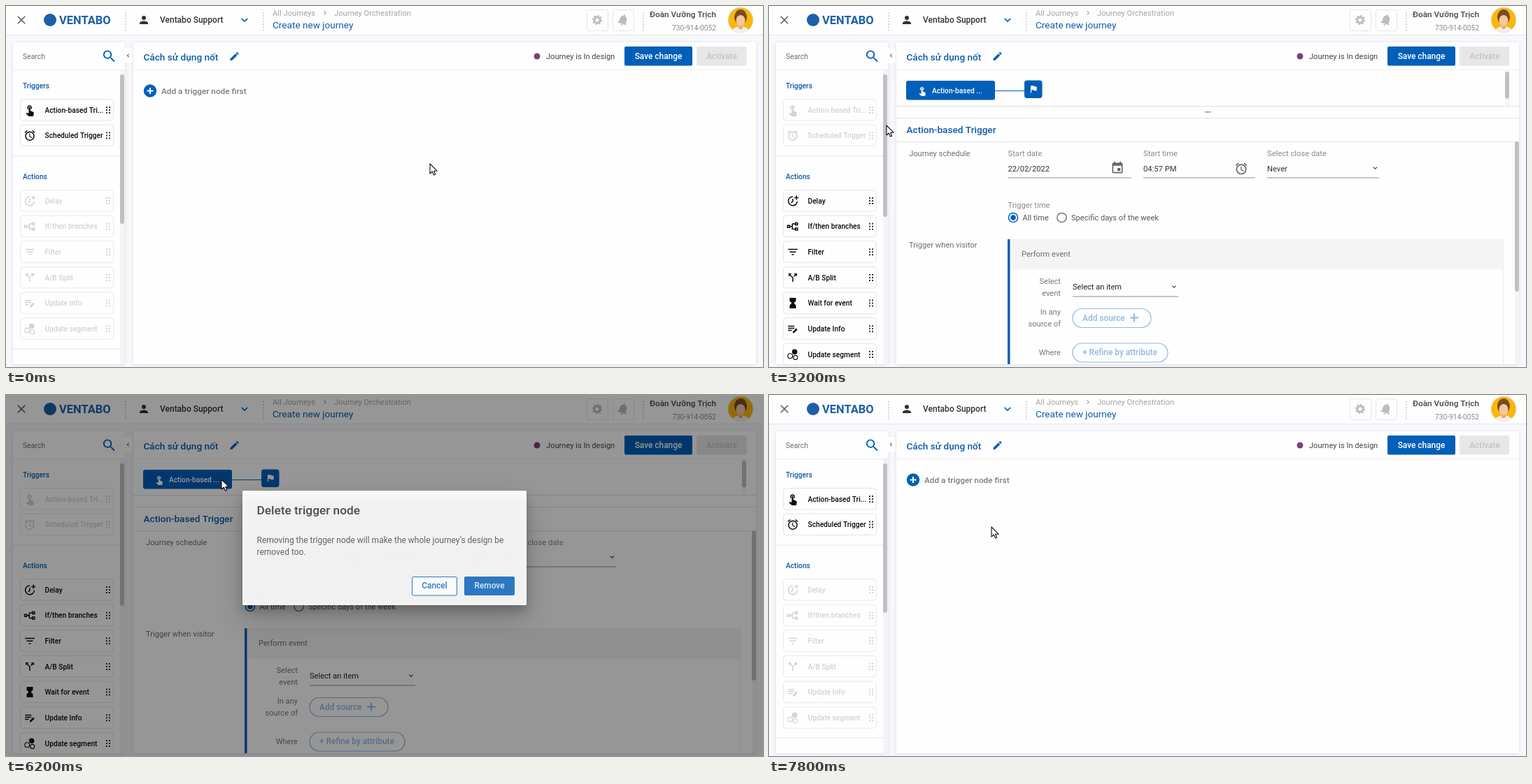
An HTML page with a canvas for the animation above (8000 ms loop, 1082 by 517 pixels).

```html
<!DOCTYPE html>
<html lang="vi">
<head>
<meta charset="utf-8">
<title>Create new journey</title>
<style>
html, body { margin: 0; width: 100%; height: 100%; overflow: hidden; background: #f7f8fb; }
canvas { display: block; width: 1082px; height: 517px; }
</style>
</head>
<body>
<canvas id="stage" width="1082" height="517"></canvas>
<script>
const ctx = document.getElementById('stage').getContext('2d');
const LOOP = 8000, STEP = 200;
const BLUE = '#005fb8', TITLE = '#0f5ba8', WHITE = '#fefefe', GREY = '#6e6e6e', OFF = '#d2d2d2', PALE = '#8fb9df';

// Filled and stroked icons on a 24 unit grid
const FILLED = {
  touch: 'M9 11.24V7.5C9 6.12 10.12 5 11.5 5S14 6.12 14 7.5v3.74c1.21-.81 2-2.18 2-3.74C16 5.01 13.99 3 11.5 3S7 5.01 7 7.5c0 1.56.79 2.93 2 3.74zm9.84 4.63l-4.54-2.26c-.17-.07-.35-.11-.54-.11H13v-6c0-.83-.67-1.5-1.5-1.5S10 6.67 10 7.5v10.74l-3.67-.75-1.58 1.13 4.94 4.94c.27.27.65.44 1.06.44h6.79c.75 0 1.33-.55 1.44-1.28l.75-5.27c.1-.7-.36-1.36-.89-1.58z',
  alarm: 'M22 5.72l-4.6-3.86-1.29 1.53 4.6 3.86zM7.88 3.39L6.6 1.86 2 5.71l1.29 1.53zM12.5 8H11v6l4.75 2.85.75-1.23-4-2.37zM12 4a9 9 0 1 0 0 18 9 9 0 1 0 0-18zm0 16a7 7 0 1 1 0-14 7 7 0 1 1 0 14z',
  person: 'M12 12a4 4 0 1 0 0-8 4 4 0 1 0 0 8zm0 2c-2.67 0-8 1.34-8 4v2h16v-2c0-2.66-5.33-4-8-4z',
  search: 'M15.5 14h-.79l-.28-.27A6.47 6.47 0 0 0 16 9.5 6.5 6.5 0 1 0 9.5 16c1.61 0 3.09-.59 4.23-1.57l.27.28v.79l5 4.99L20.49 19zm-6 0a4.5 4.5 0 1 1 0-9 4.5 4.5 0 1 1 0 9z',
  edit: 'M3 17.25V21h3.75L17.81 9.94l-3.75-3.75zM20.71 7.04a1 1 0 0 0 0-1.41l-2.34-2.34a1 1 0 0 0-1.41 0l-1.83 1.83 3.75 3.75z',
  close: 'M19 6.41L17.59 5 12 10.59 6.41 5 5 6.41 10.59 12 5 17.59 6.41 19 12 13.41 17.59 19 19 17.59 13.41 12z',
  down: 'M16.59 8.59L12 13.17 7.41 8.59 6 10l6 6 6-6z',
  filter: 'M10 18h4v-2h-4zM3 6v2h18V6zm3 7h12v-2H6z',
  split: 'M14 4l2.29 2.29-2.88 2.88 1.42 1.42 2.88-2.88L20 10V4zm-4 0H4v6l2.29-2.29 4.71 4.7V20h2v-8.41l-5.29-5.3z',
  wait: 'M6 2v6l4 4-4 4v6h12v-6l-4-4 4-4V2z',
  bell: 'M12 22a2 2 0 0 0 2-2h-4a2 2 0 0 0 2 2zm6-6v-5c0-3.07-1.64-5.64-4.5-6.32V4a1.5 1.5 0 0 0-3 0v.68C7.63 5.36 6 7.92 6 11v5l-2 2v1h16v-1z',
  date: 'M17 12h-5v5h5zM16 1v2H8V1H6v2H5a2 2 0 0 0-2 2v14a2 2 0 0 0 2 2h14a2 2 0 0 0 2-2V5a2 2 0 0 0-2-2h-1V1zm3 18H5V8h14z',
  flag: 'M14.4 6L14 4H5v17h2v-7h5.6l.4 2h7V6z',
  info: 'M3 10h12v2H3zM3 6h12v2H3zM3 14h7v2H3zM12 20v-2.5l6.5-6.5 2.5 2.5-6.500 6.500z'
};
const STROKED = {
  delay: 'M12 4a8.500 8.500 0 1 0 8.500 9M12 8v5l-3 3M19 2v8M15 6h8',
  branch: 'M5 12h6M11 7v10M11 7h6M11 17h6M2 10h4v4H2zM17 5h4v4h-4zM17 15h4v4h-4z'
};
const paths = {};
for (const k in FILLED) paths[k] = new Path2D(FILLED[k]);
for (const k in STROKED) paths[k] = new Path2D(STROKED[k]);
const ARROW = new Path2D('M0 0V14L3.300 11 5.500 16 7.700 15 5.600 10.200H10Z');
const HAND = new Path2D('M-1.500 1.200C-1.500-.6 1.400-.6 1.400 1.200V6.600C1.800 5.600 4 5.800 4 7.200 4.600 6.200 6.600 6.600 6.600 8 7.400 7.200 9 7.800 9 9V13C9 15 7.600 16 7.600 18.500H-.2C-.2 16.600-3.200 14.400-4.600 11.400-5.200 9.800-3.400 9-2.400 10.200L-1.500 11.400Z');
const FINGERS = new Path2D('M1.400 6.600V10M4 7.200V10M6.600 8V10.500');

function box(x, y, w, h, fill, r = 0, stroke, lw = 1) {
  ctx.beginPath();
  ctx.roundRect(x, y, w, h, r);
  if (fill) { ctx.fillStyle = fill; ctx.fill(); }
  if (stroke) { ctx.strokeStyle = stroke; ctx.lineWidth = lw; ctx.stroke(); }
}

function shadowBox(x, y, w, h, r, color, blur, dy) {
  ctx.save();
  ctx.shadowColor = color;
  ctx.shadowBlur = blur;
  ctx.shadowOffsetY = dy;
  box(x, y, w, h, WHITE, r);
  ctx.restore();
}

function dot(x, y, r, fill, stroke, lw = 1.5) {
  ctx.beginPath();
  ctx.arc(x, y, r, 0, 7);
  if (fill) { ctx.fillStyle = fill; ctx.fill(); }
  if (stroke) { ctx.strokeStyle = stroke; ctx.lineWidth = lw; ctx.stroke(); }
}

function line(x1, y1, x2, y2, color, lw = 1) {
  ctx.beginPath();
  ctx.moveTo(x1, y1);
  ctx.lineTo(x2, y2);
  ctx.strokeStyle = color;
  ctx.lineWidth = lw;
  ctx.stroke();
}

// y is the middle of the capitals
function text(s, x, y, size, color, weight = 400, align = 'left') {
  ctx.font = `${weight} ${size}px Roboto, sans-serif`;
  ctx.textAlign = align;
  ctx.fillStyle = color;
  ctx.fillText(s, x, y + size * 0.36);
}

function icon(name, x, y, size, color, turn = 0) {
  ctx.save();
  ctx.translate(x, y);
  ctx.rotate(turn);
  ctx.scale(size / 24, size / 24);
  ctx.translate(-12, -12);
  ctx.fillStyle = ctx.strokeStyle = color;
  ctx.lineWidth = 2;
  if (name === 'segment') {
    dot(15.5, 7, 5, color);
    dot(7, 15, 4.5, null, color, 1.5);
    dot(17, 18, 4, null, color, 1.5);
  } else if (STROKED[name]) ctx.stroke(paths[name]);
  else ctx.fill(paths[name]);
  ctx.restore();
}

function gear(x, y, color) {
  ctx.beginPath();
  for (let i = 0; i < 32; i++) {
    const a = (i + 0.5) * Math.PI / 16, r = i % 4 < 2 ? 7.4 : 5.5;
    ctx.lineTo(x + r * Math.cos(a), y + r * Math.sin(a));
  }
  ctx.fillStyle = color;
  ctx.fill();
  dot(x, y, 2.6, WHITE);
}

function dots(x) {
  for (let y = 9; y < 34; y += 4) box(x - 1, y, 2, 2, '#d6d6d6');
}

function avatar(x, y) {
  ctx.save();
  dot(x, y, 18, '#fbb60a', '#e8e4da', 1);
  ctx.clip();
  ctx.beginPath();
  ctx.ellipse(x, y + 18, 13, 9, 0, 0, 7);
  ctx.fillStyle = '#f1efec';
  ctx.fill();
  box(x - 3, y + 6, 6, 7, '#e2a97c', 2);
  ctx.beginPath();
  ctx.ellipse(x, y - 4, 9, 11, 0, 0, 7);
  ctx.fillStyle = '#7a4a20';
  ctx.fill();
  ctx.beginPath();
  ctx.ellipse(x, y + 1, 6.5, 8, 0, 0, 7);
  ctx.fillStyle = '#f3c7a0';
  ctx.fill();
  ctx.restore();
}

function header() {
  box(0, 0, 1082, 41, WHITE);
  line(0, 41.5, 1082, 41.5, '#e6e6ea');
  icon('close', 22, 20, 20, '#666');
  dot(63, 20, 9, '#1d5fa9');
  text('VENTABO', 76, 20, 16.5, '#1d5fa9', 700);
  dots(171); dots(368); dots(911);
  icon('person', 197, 20, 18, '#333');
  text('Ventabo Support', 220, 20, 12, '#333', 500);
  icon('down', 341, 20, 19, BLUE);
  text('All Journeys', 381, 10, 11.2, '#a5a5a5');
  icon('down', 456, 10, 12, '#999', -Math.PI / 2);
  text('Journey Orchestration', 469, 10, 11.2, '#a5a5a5');
  text('Create new journey', 381, 27, 13.6, TITLE);
  for (const x of [830.5, 867.5]) box(x, 5.5, 30, 30, WHITE, 3, '#e6e6e6');
  gear(845, 20, '#bdbdbd');
  icon('bell', 882, 20, 20, '#bdbdbd', 0.3);
  text('Đoàn Vưỡng Trịch', 1015, 12, 11.8, '#444', 500, 'right');
  text('730-914-0052', 1015, 31, 10.2, '#8a8a8a', 400, 'right');
  avatar(1050, 20);
}

function item(name, label, y, on) {
  const color = on ? '#0a0a0a' : OFF;
  box(20.5, y - 15.5, 133, 30.5, WHITE, 4, on ? '#e4e4e4' : '#e9e9e9');
  icon(name, 34, y, 18, color);
  text(label, 55.5, y, 10.2, color, 500);
  for (let i = 0; i < 6; i++) box(143 + i % 2 * 4, y - 5 + (i >> 1) * 4, 2, 2, on ? '#333' : OFF);
}

function sidebar(edit) {
  shadowBox(10, 52, 160, 461, 2, 'rgba(60,70,110,.14)', 5, 1);
  shadowBox(167, 60, 14, 22, 4, 'rgba(60,70,110,.10)', 2, 0);
  box(163, 60, 8, 22, WHITE);
  icon('down', 174.5, 71, 10, '#333', Math.PI / 2);
  ctx.save();
  ctx.beginPath();
  ctx.rect(10, 52, 160, 461);
  ctx.clip();
  box(163, 92, 7, 421, '#f3f4f6');
  box(163, 98, 6, edit ? 204 : 214, '#c0c0c2', 3);
  text('Search', 24, 72, 10.4, GREY);
  icon('search', 147.5, 72, 23, BLUE);
  line(10, 91.5, 170, 91.5, '#ebebeb');
  text('Triggers', 24, 114, 10.2, TITLE, 500);
  item('touch', 'Action-based Tri...', 149, !edit);
  item('alarm', 'Scheduled Trigger', 185.5, !edit);
  line(10, 215, 163, 215, '#e4e4e4');
  text('Actions', 24, 244, 10.2, TITLE, 500);
  const list = [['delay', 'Delay'], ['branch', 'If/then branches'], ['filter', 'Filter'], ['split', 'A/B Split']];
  if (edit) list.push(['wait', 'Wait for event']);
  list.push(['info', 'Update Info'], ['segment', 'Update segment']);
  list.forEach(([name, label], i) => item(name, label, 279 + i * 36.65, edit));
  if (!edit) line(10, 491, 163, 491, '#e4e4e4');
  ctx.restore();
}

function mainHead() {
  shadowBox(182, 52, 890, 461, 2, 'rgba(60,70,110,.14)', 5, 1);
  text('Cách sử dụng nốt', 196.5, 73.5, 13.6, TITLE, 500);
  icon('edit', 326.5, 72, 16, BLUE);
  dot(759, 72, 4.5, '#7a4373');
  text('Journey is In design', 772, 72, 11.1, '#444');
  box(884, 58, 97, 27.5, BLUE, 2);
  text('Save change', 932.5, 71.5, 11.9, '#fff', 500, 'center');
  box(987, 58, 71.5, 27.5, '#e7e7e7', 2);
  text('Activate', 1023, 71.5, 11.9, '#c3c3c3', 500, 'center');
  line(182, 91.5, 1072, 91.5, '#efefef');
}

function emptyBody() {
  dot(206, 121.5, 9.2, BLUE);
  line(201.5, 121.5, 210.5, 121.5, '#fff', 2);
  line(206, 117, 206, 126, '#fff', 2);
  text('Add a trigger node first', 222, 122, 11.8, '#7c7c7c', 500);
}

function menu(over) {
  shadowBox(102, 142, 305, 170, 2, 'rgba(0,0,0,.13)', 7, 1);
  box(400, 142, 7, 170, '#f5f5f6');
  box(400.5, 143, 6.5, 81, '#c0c0c2', 3);
  if (over) box(102, 142, 70, 70, '#d8e8fc');
  const cell = (name, words, x, y, color) => {
    icon(name, x, y, 11, color);
    words.split('|').forEach((w, i) => text(w, x, y + 14 + i * 15, 10.3, color, 400, 'center'));
  };
  cell('touch', 'Action-based|Trigger', 137, 156, '#222');
  cell('alarm', 'Scheduled|Trigger', 206, 156, '#222');
  line(102, 212.5, 400, 212.5, '#e4e4e4');
  const row = { delay: 'Delay', branch: 'If/then|branche|s', filter: 'Filter', split: 'A/B Split', info: 'Update|Info', segment: 'Update|segment' };
  Object.keys(row).forEach((k, i) => cell(k, row[k], 127 + i * 49.8, 226, '#c9c9c9'));
  line(102, 283, 400, 283, '#d8d8d8', 1.5);
  box(129, 292, 16, 16, '#4a4a4e', 1);
  dot(206, 300, 8, '#0a84ff');
  dot(275.5, 300, 8, '#e65a5a');
  dot(345, 300, 8, '#4285f4');
}

function node(over) {
  const ink = over ? '#222' : '#fff';
  box(196, 107, 127, 27.5, over ? '#d9e8fb' : BLUE, 3);
  icon('touch', 219, 121.5, 15, ink);
  text(over ? 'Action-base...' : 'Action-based ...', 233, 121.5, 10.2, ink, 500);
  if (over) icon('close', 308, 121, 15, '#222');
  line(323, 121.5, 365, 121.5, BLUE);
  box(365, 106.5, 25.5, 25.5, BLUE, 4);
  icon('flag', 378, 119, 14, '#fff');
}

function field(label, value, x, w) {
  text(label, x, 211, 11.2, '#8a8a8a');
  text(value, x, 232.5, 11.2, '#333');
  line(x, 246, x + w, 246, '#8f8f8f');
}

function pill(label, x, y, w) {
  box(x, y, w, 27, null, 13.5, PALE, 1.2);
  text(label, x + 14, y + 13, 11.9, PALE, 500);
}

function editBody(over) {
  node(over);
  box(1052, 92, 6, 51, '#f4f4f5');
  box(1052, 94, 6, 38.5, '#c0c0c2', 3);
  line(182, 143.5, 1072, 143.5, '#e2e2e2');
  for (let i = -1; i < 2; i++) box(626.5 + i * 3, 151, 1.6, 1.6, '#555');
  line(182, 160.5, 1072, 160.5, '#e2e2e2');
  text('Action-based Trigger', 196.5, 177.5, 13.6, TITLE, 500);
  line(182, 194.5, 1072, 194.5, '#e2e2e2');
  box(1066, 195, 6, 318, '#f4f4f5');
  box(1066, 194, 6, 215, '#c0c0c2', 3);

  text('Journey schedule', 200, 211, 11.2, GREY);
  field('Start date', '22/02/2022', 341.5, 176.5);
  field('Start time', '04:57 PM', 535, 159.5);
  field('Select close date', 'Never', 712, 160);
  icon('date', 498, 232, 20, '#666');
  icon('alarm', 675, 233, 20, '#666');
  icon('down', 866.5, 232, 12, '#333');

  text('Trigger time', 341.5, 285, 11.2, '#8a8a8a');
  dot(349, 303, 6.6, null, BLUE);
  dot(349, 303, 3.8, BLUE);
  text('All time', 362.5, 303, 11.1, '#555');
  dot(418.5, 303, 6.6, null, '#777');
  text('Specific days of the week', 432, 303, 11.1, '#555');

  text('Trigger when visitor', 200, 342, 11.2, GREY);
  box(345, 334, 705, 43.5, '#f4f4f4');
  line(1049.5, 334, 1049.5, 513, '#ebebeb');
  box(341, 334, 3.5, 179, BLUE);
  text('Perform event', 361, 355.5, 11.1, GREY);
  [['Select', 394.5], ['event', 411], ['In any', 438.5], ['source of', 455], ['Where', 496.5]]
    .forEach(([s, y]) => text(s, 417, y, 11.1, '#777', 400, 'right'));
  text('Select an item', 434, 402, 11.1, '#222');
  icon('down', 579, 402, 12, '#333');
  line(434, 416, 585, 416, '#8f8f8f');
  pill('Add source', 434, 433.5, 112);
  line(516, 446.5, 528, 446.5, PALE, 2);
  line(522, 440.5, 522, 452.5, PALE, 2);
  pill('+ Refine by attribute', 434, 483, 136);
}

function dialog(alpha) {
  ctx.save();
  ctx.globalAlpha = alpha;
  box(0, 0, 1082, 517, 'rgba(0,0,0,.5)');
  shadowBox(338, 137, 406, 164, 2, 'rgba(0,0,0,.2)', 40, 20);
  shadowBox(338, 137, 406, 164, 2, 'rgba(0,0,0,.25)', 14, 8);
  text('Delete trigger node', 358.5, 165, 17.3, '#2a2a2a', 500);
  text('Removing the trigger node will make the whole journey’s design be', 358.5, 207.5, 12, '#444');
  text('removed too.', 358.5, 225, 12, '#444');
  box(580.5, 260.5, 64, 26.5, WHITE, 2, BLUE);
  text('Cancel', 612.5, 273, 11.9, BLUE, 500, 'center');
  box(655, 260, 72, 27, BLUE, 2);
  text('Remove', 691, 273, 11.9, '#fff', 500, 'center');
  ctx.restore();
}

// Pointer trips: first step, last step, destination
const START = [606, 226];
const TRIPS = [
  [200, 1200, 206, 121],
  [1800, 2400, 168, 171],
  [3600, 4400, 308, 121],
  [6400, 6800, 686, 271],
  [7600, 7800, 318, 189]
];

function pointerAt(t) {
  let [x, y] = START;
  for (const [from, to, tx, ty] of TRIPS) {
    const p = Math.min(1, Math.max(0, (t - from + STEP) / (to - from + STEP)));
    const e = p * p * (3 - 2 * p);
    x += (tx - x) * e;
    y += (ty - y) * e;
  }
  return [x, y];
}

function pointer(x, y, hand) {
  ctx.save();
  ctx.translate(x, y);
  ctx.fillStyle = '#fff';
  ctx.strokeStyle = '#111';
  ctx.lineWidth = 1.1;
  ctx.lineJoin = 'round';
  ctx.fill(hand ? HAND : ARROW);
  ctx.stroke(hand ? HAND : ARROW);
  if (hand) ctx.stroke(FINGERS);
  ctx.restore();
}

function draw(t) {
  const [x, y] = pointerAt(t);
  const inside = (l, top, r, b) => x >= l && x < r && y >= top && y < b;
  const edit = t >= 2800 && t < 7200;
  const open = t >= 1600 && t < 2800;
  const fade = t < 6200 || t >= 7600 ? 0 : t < 6400 ? 0.82 : 1;
  const overNode = edit && !fade && inside(196, 107, 323, 135);
  const overMenu = open && inside(102, 142, 172, 212);
  const overAdd = !edit && !fade && inside(196, 110, 345, 133);
  const overRemove = fade && inside(655, 260, 727, 287);

  box(0, 0, 1082, 517, '#f7f8fb');
  header();
  mainHead();
  sidebar(edit);
  if (edit) editBody(overNode);
  else emptyBody();
  if (open) menu(overMenu);
  if (fade) dialog(fade);
  pointer(x, y, overNode || overMenu || overAdd || overRemove);
}

const began = performance.now();
function tick() {
  const t = (performance.now() - began) % LOOP;
  draw(Math.floor(t / STEP) * STEP);
  requestAnimationFrame(tick);
}
tick();
</script>
</body>
</html>
```
